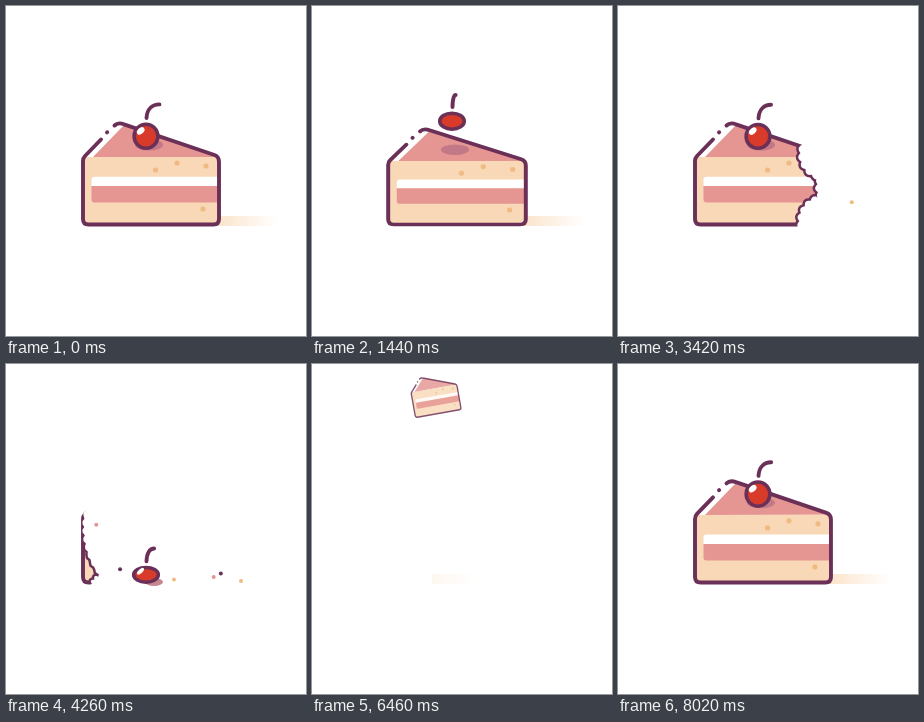
These frames come from a looping animation (300 by 330 pixels, 8040 ms). An HTML page with a canvas:

```html
<!DOCTYPE html>
<html lang="en">
<head>
<meta charset="utf-8">
<title>Cake</title>
<style>
html, body { margin: 0; width: 100%; height: 100%; overflow: hidden; background: #fff; }
canvas { display: block; width: 300px; height: 330px; }
</style>
</head>
<body>
<canvas id="stage"></canvas>
<script>
const W = 300, H = 330, LOOP = 8040;
const INK = '#6b3057', PINK = '#e59692', TAN = '#f8d8b6', DOT = '#f0ba83', RED = '#d93b2b';
const DPR = window.devicePixelRatio || 1;
const stage = document.getElementById('stage');
const layer = document.createElement('canvas');
for (const c of [stage, layer]) { c.width = W * DPR; c.height = H * DPR; }
const ctx = stage.getContext('2d'), cut = layer.getContext('2d');

const CROUCH = 640, JUMP = 800, LAND = 1360, DROP = 3980, GROUND_HIT = 4200;
const GATHER = 5940, FORM = 6240, CAKE_HIT = 6880, LAND2 = 7480;
const G = 0.003827;

const body = new Path2D('M77 213V155Q77 152 79 150L108.5 119.5Q112 116 118 118.3L208.5 149Q213 150.5 213 156V213Q213 218.5 207.5 218.5H82.5Q77 218.5 77 213Z');
const outline = new Path2D('M95 133.5L79 150Q77 152 77 155V213Q77 218.5 82.5 218.5H207.5Q213 218.5 213 213V156Q213 150.5 208.5 149L118 118.3Q112 116 108.5 119.5M101 126.4L101.2 126.2');
const topPink = new Path2D('M87 151L120 117L215 151Z');

// time, x, y, radius
const bites = [
  [2980, 222, 181, 24], [3010, 207, 216, 27], [3180, 207, 148, 26],
  [3560, 185, 180, 34], [3660, 165, 205, 34], [3760, 170, 143, 28],
  [3850, 125, 200, 32], [3910, 157, 163, 80], [3920, 98, 224, 14],
  [4340, 85, 175, 75]
];
// start time, start x, y, rest x, y, colour
const crumbs = [
  [3190, 205, 160, 235, 217, DOT], [3580, 190, 170, 207.7, 213, PINK],
  [3660, 190, 175, 214.8, 209.5, INK], [3780, 150, 165, 168, 215.5, DOT],
  [4030, 100, 185, 114.7, 217, INK], [4190, 95, 157, 84, 218, PINK]
];

const clamp = v => Math.max(0, Math.min(1, v));
const part = (t, a, b) => clamp((t - a) / (b - a));
const mix = (a, b, u) => a + (b - a) * u;

function keys(t, list) {
  for (let i = 1; i < list.length; i++)
    if (t < list[i][0]) return mix(list[i - 1][1], list[i][1], part(t, list[i - 1][0], list[i][0]));
  return list[list.length - 1][1];
}

function ellipse(c, x, y, rx, ry, fill, rot = 0) {
  c.beginPath();
  c.ellipse(x, y, rx, ry, rot, 0, Math.PI * 2);
  c.fillStyle = fill;
  c.fill();
}

function line(c, path, width) {
  c.strokeStyle = INK;
  c.lineWidth = width;
  c.lineCap = c.lineJoin = 'round';
  c.stroke(path);
}

// damped squash after an impact
function dent(dt, size) {
  return dt < 0 ? 0 : size * Math.exp(-dt / 140) * Math.sin(dt * Math.PI / 160);
}

const crouch = t => Math.sin(part(t, CROUCH, JUMP) * Math.PI / 2);

function cakeSquash(t) {
  const s = dent(t - LAND, 0.106) + dent(t - CAKE_HIT, 0.08) + dent(t - LAND2, 0.106);
  if (t < JUMP) return s + 0.1 * crouch(t);
  return s + 0.1 * Math.exp((JUMP - t) / 80) * Math.cos((t - JUMP) / 50);
}

function hop(dt) {
  for (const h of [26, 7, 2]) {
    const d = 2 * Math.sqrt(2 * h / G);
    if (dt < d) return G / 2 * dt * (d - dt);
    dt -= d;
  }
  return 0;
}

// null while there is no cherry
function cherryPose(t) {
  const p = { lift: 0, sx: 1, sy: 1, tip: 12.5, shine: 1, size: 1, ground: 0 };
  const settle = (dt, bend) => {
    p.sy = 1 - 0.5 * Math.exp(-dt / 150) * Math.cos((dt - 70) * Math.PI / 165);
    p.sx = 1 + 0.1 * (1 - p.sy);
    p.tip = 12.5 - 14 * bend * Math.exp(-dt / 200) * Math.cos((dt - 80) * Math.PI / 180);
  };
  const onCake = dt => {
    settle(dt, 1);
    p.lift = hop(dt);
    p.shine = part(dt, 120, 260);
  };
  if (t < CROUCH) onCake(t + LOOP - LAND2);
  else if (t < JUMP) {
    p.sy = 1 - 0.25 * crouch(t);
    p.sx = 1 + 0.1 * crouch(t);
  } else if (t < LAND) {
    p.lift = G / 2 * (t - JUMP) * (LAND - t);
    p.sy = 1.12;
    p.sx = 0.95;
    p.tip = keys(t, [[JUMP, 12.5], [900, 5], [1200, 9], [LAND, 12]]);
    p.shine = 1 - part(t, JUMP, 900);
  } else if (t < DROP) onCake(t - LAND);
  else if (t < GROUND_HIT) {
    const u = part(t, DROP, GROUND_HIT);
    p.ground = u * u;
    p.sy = 1 + 0.12 * u;
    p.sx = 1 - 0.05 * u;
  } else if (t < 5220) {
    p.ground = 1;
    settle(t - GROUND_HIT, 0.5);
    p.size = keys(t, [[4800, 1], [4930, 1.07], [5220, 0]]);
  } else if (t < LAND2) {
    const dt = LAND2 - t;
    if (dt > 310) return null;
    p.lift = G / 2 * dt * (560 - dt);
    p.sy = 1.12;
    p.sx = 0.95;
    p.shine = 0;
  } else onCake(t - LAND2);
  return p;
}

function drawCherry(p, squash) {
  const rest = mix(219 - 75 * (1 - squash), 220, p.ground);
  const bottom = rest - p.lift, ry = 13.6 * p.sy, cy = bottom - ry, top = cy - ry;
  if (p.ground > 0.5) {
    ctx.globalAlpha = part(p.ground, 0.5, 1);
    ellipse(ctx, 148, 218, 9 * p.size, 4 * p.size, '#c58690');
    ctx.globalAlpha = 1;
  }
  ctx.save();
  ctx.translate(140, cy);
  ctx.scale(p.size, p.size);
  ctx.translate(-140, -cy);
  ctx.beginPath();
  ctx.ellipse(140, cy, 13.6 * p.sx - 1.7, Math.max(1, ry - 1.7), 0, 0, Math.PI * 2);
  ctx.fillStyle = RED;
  ctx.fill();
  ctx.strokeStyle = INK;
  ctx.lineWidth = 3.5;
  ctx.stroke();
  ctx.globalAlpha = p.shine;
  ellipse(ctx, 140 - 5.3 * p.sx, cy - 5.3 * p.sy, 4.4, 2.9 * p.sy, '#fff', -0.75);
  ctx.globalAlpha = 1;
  const y = top - 4.5, len = 11.5 + 0.16 * p.tip, x = p.tip;
  const stem = new Path2D();
  stem.moveTo(140.5, y);
  stem.bezierCurveTo(140.5 + x * 0.04, y - len * 0.65, 140.5 + x * 0.45, y - len, 140.5 + x, y - len);
  line(ctx, stem, 3.9);
  ctx.restore();
}

function drawCake(c, shade) {
  c.save();
  c.clip(body);
  c.fillStyle = '#fff';
  c.fillRect(70, 110, 150, 115);
  c.fillStyle = PINK;
  c.fill(topPink);
  if (shade > 0) ellipse(c, 143, 139, 14 * shade, 5.5 * shade, '#c27886');
  c.fillStyle = TAN;
  c.fillRect(70, 151, 150, 70);
  c.beginPath();
  c.roundRect(85.5, 170.7, 140, 25.8, 3);
  c.clip();
  c.fillStyle = '#fff';
  c.fillRect(80, 170, 140, 10);
  c.fillStyle = PINK;
  c.fillRect(80, 180, 140, 20);
  c.restore();
  for (const [x, y] of [[149.5, 164], [171, 157], [200, 160], [197, 203]]) ellipse(c, x, y, 2.6, 2.6, DOT);
  line(c, outline, 3.9);
}

function bitePath(x, y, r) {
  const path = new Path2D(), n = Math.max(8, Math.round(r / 2.8));
  for (let i = 0; i < 180; i++) {
    const a = i * Math.PI / 90;
    const q = r - 1.5 + 2.4 * Math.abs(Math.sin(n * a + x));
    path.lineTo(x + q * Math.cos(a), y + q * Math.sin(a));
  }
  path.closePath();
  return path;
}

function drawBitten(t, shade) {
  cut.setTransform(DPR, 0, 0, DPR, 0, 0);
  cut.clearRect(0, 0, W, H);
  drawCake(cut, shade);
  const holes = bites.filter(b => t >= b[0])
    .map(([at, x, y, r]) => bitePath(x, y, r * mix(0.6, 1, part(t, at, at + 50))));
  cut.globalCompositeOperation = 'destination-out';
  holes.forEach(h => cut.fill(h));
  cut.globalCompositeOperation = 'source-atop';
  holes.forEach(h => line(cut, h, 5));
  cut.globalCompositeOperation = 'source-over';
  ctx.drawImage(layer, 0, 0, W, H);
}

function drawShadow(x, width, alpha) {
  if (alpha <= 0) return;
  const g = ctx.createLinearGradient(x, 0, x + width, 0);
  g.addColorStop(0, `rgba(247,198,145,${alpha})`);
  g.addColorStop(1, 'rgba(247,198,145,0)');
  ctx.fillStyle = g;
  ctx.fillRect(x, 210, width, 10);
}

function drawCrumbs(t) {
  crumbs.forEach(([at, x0, y0, x1, y1, color], i) => {
    const go = GATHER + i * 20;
    if (t < at || t > go + 340) return;
    const u = part(t, at, at + 290), v = part(t, go, go + 340);
    const x = mix(x0, x1, 1 - (1 - u) ** 2), y = mix(y0, y1, u * u);
    ellipse(ctx, mix(x, 131, v * v), mix(y, 75, v * v), 2, 2, color);
  });
}

function drawFlyingCake(t) {
  const s = keys(t, [[FORM, 0.05], [6460, 0.34], [6740, 0.7], [CAKE_HIT, 1]]);
  const x = keys(t, [[FORM, 135], [6460, 123], [CAKE_HIT, 145]]);
  const y = 27 + 0.00109 * (t - 6520) ** 2;
  const turn = keys(t, [[FORM, 30], [6460, -10], [6600, -13], [CAKE_HIT, 0]]);
  const stretch = keys(t, [[6460, 1.1], [CAKE_HIT, 1]]);
  drawShadow(x - 3, 127 * s, keys(t, [[FORM, 0], [6460, 0.14], [CAKE_HIT, 1]]));
  ctx.save();
  ctx.globalAlpha = keys(t, [[FORM, 0], [6460, 0.82], [6520, 1]]);
  ctx.translate(x, y);
  ctx.rotate(turn * Math.PI / 180);
  ctx.scale(s, s * stretch);
  ctx.translate(-145, -168);
  drawCake(ctx, 0);
  ctx.restore();
}

function drawStandingCake(t, squash, shade) {
  drawShadow(145, 127, t < 5000 ? 1 - part(t, 2300, 2980) : 1);
  const dt = t - CAKE_HIT;
  const rock = dt > 0 ? -3 * Math.exp(-dt / 230) * Math.sin(dt * Math.PI / 440) : 0;
  ctx.save();
  ctx.translate(145, 219);
  ctx.rotate(rock * Math.PI / 180);
  ctx.scale(1 + 0.2 * squash, 1 - squash);
  ctx.translate(-145, -219);
  if (t > 2900 && t < 5000) drawBitten(t, shade);
  else drawCake(ctx, shade);
  ctx.restore();
}

function cherryShade(t, p) {
  if (!p || p.ground) return 0;
  if (t > 5000 && t < LAND2) return part(t, LAND2 - 200, LAND2);
  return 1 - 0.5 * clamp((p.lift - 30) / 120);
}

function draw(t) {
  ctx.setTransform(DPR, 0, 0, DPR, 0, 0);
  ctx.fillStyle = '#fff';
  ctx.fillRect(0, 0, W, H);
  const squash = cakeSquash(t), p = cherryPose(t);
  if (t >= FORM && t < CAKE_HIT) drawFlyingCake(t);
  else if (t < 4400 || t >= CAKE_HIT) drawStandingCake(t, squash, cherryShade(t, p));
  drawCrumbs(t);
  if (p && p.size > 0) drawCherry(p, squash);
}

const start = performance.now();
function frame() {
  draw((performance.now() - start) % LOOP);
  requestAnimationFrame(frame);
}
frame();
</script>
</body>
</html>
```
